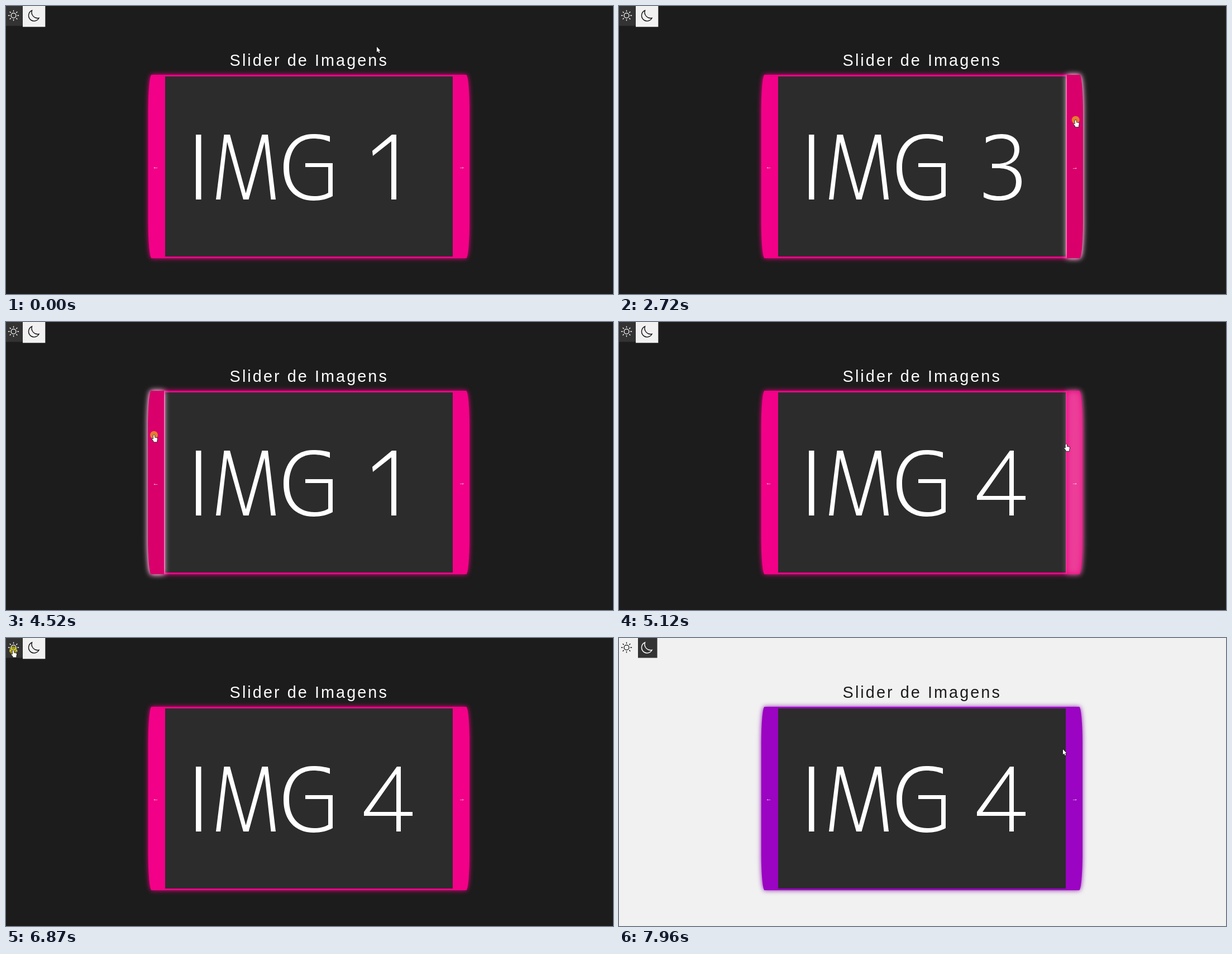
Write an HTML page with a canvas that moves like this. It is 1087x515 px and loops after 8 s.

```html
<!DOCTYPE html>
<html lang="pt">
<head>
<meta charset="utf-8">
<title>Slider de Imagens</title>
<style>
html, body { margin: 0; width: 100%; height: 100%; overflow: hidden; background: #1c1c1c; }
canvas { display: block; }
</style>
</head>
<body>
<canvas id="stage" width="1087" height="515"></canvas>
<script>
const ctx = document.getElementById('stage').getContext('2d');
const LOOP = 8000;

const dark = { bg: '#1c1c1c', ink: '#ffffff', main: '#f20087', glow: '#f20087' };
const light = { bg: '#f1f1f1', ink: '#1c1c1c', main: '#9b04c2', glow: '#8a1caa' };

const letters = new Path2D(
  'M340 230H349.5V346H340Z' +
  'M376 346L390.5 230H401L429.5 335L458.5 230H469L483 346H474.5L463 243L434.5 346H425L396 243L384 346Z' +
  'M580 233C571 230.5 562 229 550 229C518 229 497 253 497 289C497 325 517 348 551 348' +
  'C564 348 576 345 585 340V281H536V288H577V334C570 338 562 340 552 340' +
  'C524 340 507 321 507 289C507 257 524 237 550 237C562 237 571 239 580 243Z');

const digits = [
  'M691 230H699V346H690V242L657 268L656 259Z',
  'M654 237C664 231 675 229 685 229C708 229 720 241 720 260C720 286 697 306 666 338H722V346H652V340' +
  'C690 303 711 285 711 261C711 246 701 237 685 237C674 237 664 240 655 246Z',
  'M657 235C666 231 676 229 685 229C706 229 717 240 717 256C717 271 708 281 692 285' +
  'C711 287 721 298 721 314C721 335 706 348 680 348C670 348 661 346 653 342V333' +
  'C662 338 671 340 680 340C700 340 711 331 711 314C711 298 699 290 678 290H668V282H678' +
  'C697 282 708 273 708 257C708 244 699 237 684 237C674 237 665 240 657 245Z',
  'M700 230H707V311H728V318H707V346H699V318H641V311ZM699 243L651 311H699Z'
].map(d => new Path2D(d));

const moon = new Path2D('M46.5 8A9.8 9.8 0 1 0 59 21.5A10.6 10.6 0 0 1 46.5 8Z');
const arrowShape = new Path2D('M0 0V9.5L2.2 7.5L3.7 11L5.3 10.3L3.8 7H6.5Z');
const handShape = new Path2D(
  'M-1.2 1Q0 -.8 1.2 1V4.5L5 5.3Q6.3 5.6 6.2 7L5.4 10V12.5H-.6V11L-3.6 7.6Q-3.4 6 -1.2 7.6Z');

// [start, end, x, y]: the pointer reaches x, y at end
const moves = [
  [0, 0, 664, 73], [150, 530, 656, 172], [740, 1500, 817, 201],
  [2260, 2980, 818, 205], [3520, 4320, 265, 202], [4650, 5190, 826, 219],
  [6000, 6800, 13, 22], [7000, 7610, 712, 153], [7610, 7960, 795, 199]
];

// [press, release, slide step]
const clicks = [
  [1530, 1600, 1], [1860, 1930, 1], [1990, 2060, 1],
  [2260, 2330, 1], [2390, 2460, 1], [2520, 2590, 1], [2720, 2790, 1], [2910, 2980, 1],
  [3130, 3180, 1], [4390, 4450, -1], [4520, 4590, -1],
  [5250, 5320, 1], [5580, 5650, 1], [5780, 5850, 1], [5910, 5980, 1],
  [6870, 6930, 0]
];
const SWITCH = 6930;

const clamp = v => Math.max(0, Math.min(1, v));
const ease = v => v * v * (3 - 2 * v);

function pointer(t) {
  let [, , x, y] = moves[0];
  for (const [a, b, nx, ny] of moves.slice(1)) {
    if (t <= a) break;
    const k = ease(clamp((t - a) / (b - a)));
    x += (nx - x) * k;
    y += (ny - y) * k;
  }
  return [x, y];
}

const fade = (t, a, b) => clamp((t - a) / 200) * (1 - clamp((t - b) / 200));

function box(color, x, y, w, h) {
  ctx.fillStyle = color;
  ctx.fillRect(x, y, w, h);
}

// Elliptic corners on the chosen sides, 6 wide and 65 tall
function panel(x1, x2, left, right) {
  const y1 = 123, y2 = 451, ry = 65, l = left ? 6 : 0, r = right ? 6 : 0;
  const q = Math.PI / 2;
  ctx.beginPath();
  ctx.moveTo(x1 + l, y1);
  ctx.lineTo(x2 - r, y1);
  if (r) {
    ctx.ellipse(x2 - r, y1 + ry, r, ry, 0, -q, 0);
    ctx.ellipse(x2 - r, y2 - ry, r, ry, 0, 0, q);
  } else ctx.lineTo(x2, y2);
  ctx.lineTo(x1 + l, y2);
  if (l) {
    ctx.ellipse(x1 + l, y2 - ry, l, ry, 0, q, 2 * q);
    ctx.ellipse(x1 + l, y1 + ry, l, ry, 0, 2 * q, 3 * q);
  }
  ctx.closePath();
}

function glowFill(color, glow, blur, alpha = 1) {
  ctx.save();
  ctx.globalAlpha = alpha;
  ctx.shadowColor = glow;
  ctx.shadowBlur = blur;
  ctx.fillStyle = color;
  ctx.fill();
  ctx.restore();
}

function sun(color) {
  ctx.strokeStyle = color;
  ctx.lineWidth = 1.3;
  ctx.beginPath();
  ctx.arc(13.5, 17, 4.4, 0, 7);
  for (let i = 0; i < 8; i++) {
    const c = Math.cos(i * Math.PI / 4), s = Math.sin(i * Math.PI / 4);
    ctx.moveTo(13.5 + 6.8 * c, 17 + 6.8 * s);
    ctx.lineTo(13.5 + 9.6 * c, 17 + 9.6 * s);
  }
  ctx.stroke();
}

function themeButtons(isLight) {
  if (isLight) {
    box('#333333', 34, 0, 34.5, 35.5);
  } else {
    box('#333333', 0, 0, 30, 35.5);
    box('#f1f1f1', 30, 0, 40.3, 37.3);
  }
  sun(isLight ? '#111' : '#fff');
  ctx.strokeStyle = isLight ? '#fff' : '#111';
  ctx.lineWidth = 1.4;
  ctx.stroke(moon);
}

function label(text, x, y, font, color, spacing, align) {
  ctx.font = font + ' "Liberation Sans", Arial, sans-serif';
  ctx.letterSpacing = spacing;
  ctx.textAlign = align;
  ctx.fillStyle = color;
  ctx.fillText(text, x, y);
}

function drawPointer(x, y, hand) {
  ctx.save();
  ctx.translate(x, y);
  const shape = hand ? handShape : arrowShape;
  ctx.lineJoin = 'round';
  ctx.lineWidth = 1.4;
  ctx.strokeStyle = '#111';
  ctx.stroke(shape);
  ctx.fillStyle = '#fff';
  ctx.fill(shape);
  ctx.restore();
}

function draw(t) {
  const isLight = t >= SWITCH;
  const theme = isLight ? light : dark;
  let slide = 0;
  for (const [, up, step] of clicks) if (t >= up) slide = (slide + step + 4) % 4;

  box(theme.bg, 0, 0, 1087, 515);
  themeButtons(isLight);
  label('Slider de Imagens', 400.6, 106.5, '28.8px', theme.ink, '3.07px', 'left');

  panel(254.7, 830, true, true);
  glowFill(theme.main, theme.glow, 9);
  box('#2c2c2c', 285, 126, 515, 322);
  ctx.fillStyle = '#fff';
  ctx.fill(letters);
  ctx.fill(digits[slide], 'evenodd');

  const overLeft = fade(t, 4180, 4740);
  const overRight = Math.max(fade(t, 1270, 3640), fade(t, 5040, 6120));
  if (overLeft) {
    panel(254, 283, true, false);
    glowFill('#da006b', '#fff', 11, overLeft);
  }
  if (overRight) {
    panel(802, 831, false, true);
    glowFill('#da006b', '#fff', 11, overRight);
  }
  label('←', 268.3, 291 + overLeft * 0.7, '11px', '#fff', '0px', 'center');
  label('→', 816.3, 291 + overRight * 0.7, '11px', '#fff', '0px', 'center');

  const [x, y] = pointer(t);
  if (clicks.some(([down, up]) => t >= down && t < up)) {
    ctx.fillStyle = 'rgba(240,225,0,.55)';
    ctx.beginPath();
    ctx.arc(x, y, 7, 0, 7);
    ctx.fill();
  }
  const onButton = y > 123 && y < 451 && (x > 255 && x < 285 || x > 800 && x < 830);
  const onTheme = x < 70 && y < 37;
  drawPointer(x, y, onButton || onTheme);
}

function tick() {
  draw(performance.now() % LOOP);
  requestAnimationFrame(tick);
}
tick();
</script>
</body>
</html>
```
